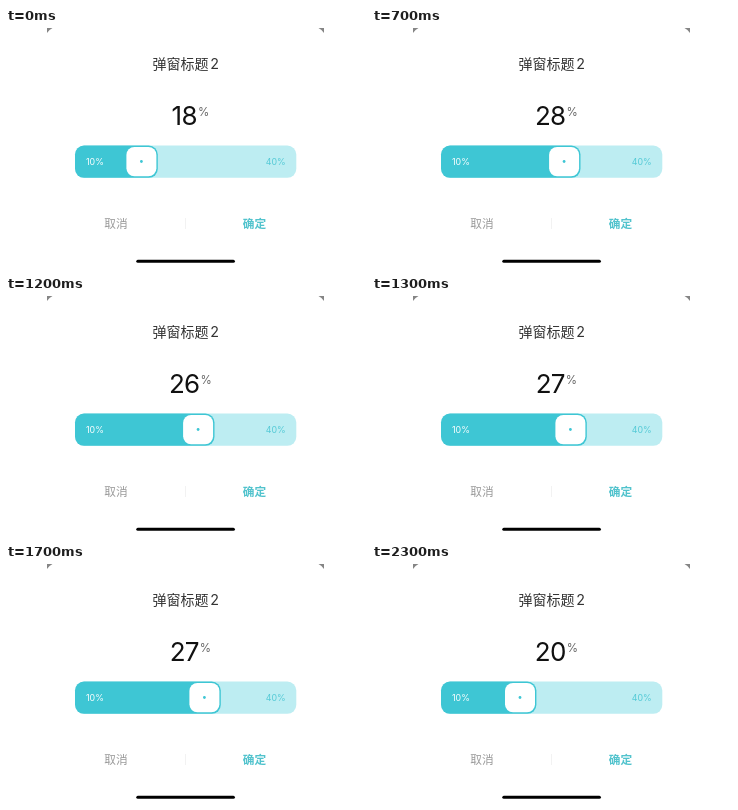
Animation, 360 px wide and 240 px high, one loop 2400 ms. Source, as an HTML page with a canvas:

```html
<!DOCTYPE html>
<html lang="zh">
<head>
<meta charset="utf-8">
<style>
  html, body { margin: 0; width: 100%; height: 100%; overflow: hidden; background: #fff; }
  canvas { display: block; width: 360px; height: 240px; }
</style>
</head>
<body>
<canvas id="stage"></canvas>
<script>
const LOOP = 2400, STEP = 100, LABEL_LAG = 50;
const TEAL = '#3ec6d4', PALE = '#bdedf2';
const LATIN = 'Inter, "Liberation Sans", sans-serif';
const CJK = '"Noto Sans CJK SC", "Noto Sans CJK", sans-serif';
const TRACK = { x: 69, y: 117.5, w: 221.3, h: 32.3, r: 9 };

// Turning points of the drag: time and percent.
const DRAG = [
  [0, 18], [300, 18], [350, 31], [450, 32], [900, 23],
  [1150, 26], [1400, 28.5], [1600, 26.4], [1750, 28.6], [2250, 20]
];

const canvas = document.getElementById('stage');
const ctx = canvas.getContext('2d');
const ratio = window.devicePixelRatio || 1;
canvas.width = 360 * ratio;
canvas.height = 240 * ratio;
ctx.scale(ratio, ratio);

function percentAt(time) {
  const next = DRAG.findIndex(point => point[0] > time);
  if (next < 0) return DRAG.at(-1)[1];
  if (next === 0) return DRAG[0][1];
  const [t0, p0] = DRAG[next - 1], [t1, p1] = DRAG[next];
  return Math.round(p0 + (p1 - p0) * (time - t0) / (t1 - t0));
}

function box(x, y, w, h, r, color) {
  ctx.fillStyle = color;
  ctx.beginPath();
  ctx.roundRect(x, y, w, h, r);
  ctx.fill();
}

function label(text, x, baseline, font, color, align = 'left') {
  ctx.font = font;
  ctx.textAlign = align;
  ctx.fillStyle = color;
  ctx.fillText(text, x, baseline);
}

function corner(x, dir) {
  ctx.fillStyle = '#858585';
  ctx.beginPath();
  ctx.moveTo(x, 0);
  ctx.lineTo(x + 5.5 * dir, 0);
  ctx.quadraticCurveTo(x + 2 * dir, 1.8, x, 5);
  ctx.fill();
}

function drawValue(value) {
  const big = '400 26px ' + LATIN, small = '400 11.5px ' + LATIN;
  ctx.letterSpacing = '-0.8px';
  ctx.font = big;
  const numberWidth = ctx.measureText(value).width + 1.2;
  ctx.letterSpacing = '0px';
  ctx.font = small;
  const left = 184.4 - (numberWidth + ctx.measureText('%').width) / 2;
  label('%', left + numberWidth, 88.3, small, '#666');
  ctx.letterSpacing = '-0.8px';
  label(value, left, 97, big, '#111');
  ctx.letterSpacing = '0px';
}

function drawSlider(percent) {
  const x = 85 + 6.3 * (percent - 10);
  const { x: left, y, w, h, r } = TRACK;
  const font = '400 8.8px ' + LATIN;
  box(left, y, w, h, r, PALE);
  box(left, y, x + 16.4 - left, h, r, TEAL);
  label('10%', 80, 136.6, font, '#fff');
  label('40%', 279.7, 136.6, font, '#52c9d5', 'right');
  box(x - 15, y + 1.5, 30, h - 3, 8, '#fff');
  box(x - 1.4, 132.1, 2.8, 2.8, 1.4, TEAL);
}

function draw(time) {
  const now = Math.floor(time / STEP) * STEP;
  ctx.fillStyle = '#fff';
  ctx.fillRect(0, 0, 360, 240);
  corner(41, 1);
  corner(318, -1);
  label('弹窗标题', 146.4, 41.1, '400 14px ' + CJK, '#333');
  label('2', 204.2, 41.4, '400 14.3px ' + LATIN, '#333');
  drawValue(String(percentAt(now - LABEL_LAG)));
  drawSlider(percentAt(now));
  label('取消', 110, 199.8, '400 11.7px ' + CJK, '#999', 'center');
  label('确定', 248.5, 199.8, '700 11.7px ' + CJK, '#52c3cd', 'center');
  ctx.fillStyle = '#f2f2f2';
  ctx.fillRect(179, 190, 1, 11);
  box(130.3, 231.7, 98.6, 3, 1.5, '#000');
}

function tick() {
  draw(performance.now() % LOOP);
  requestAnimationFrame(tick);
}
tick();
</script>
</body>
</html>
```
